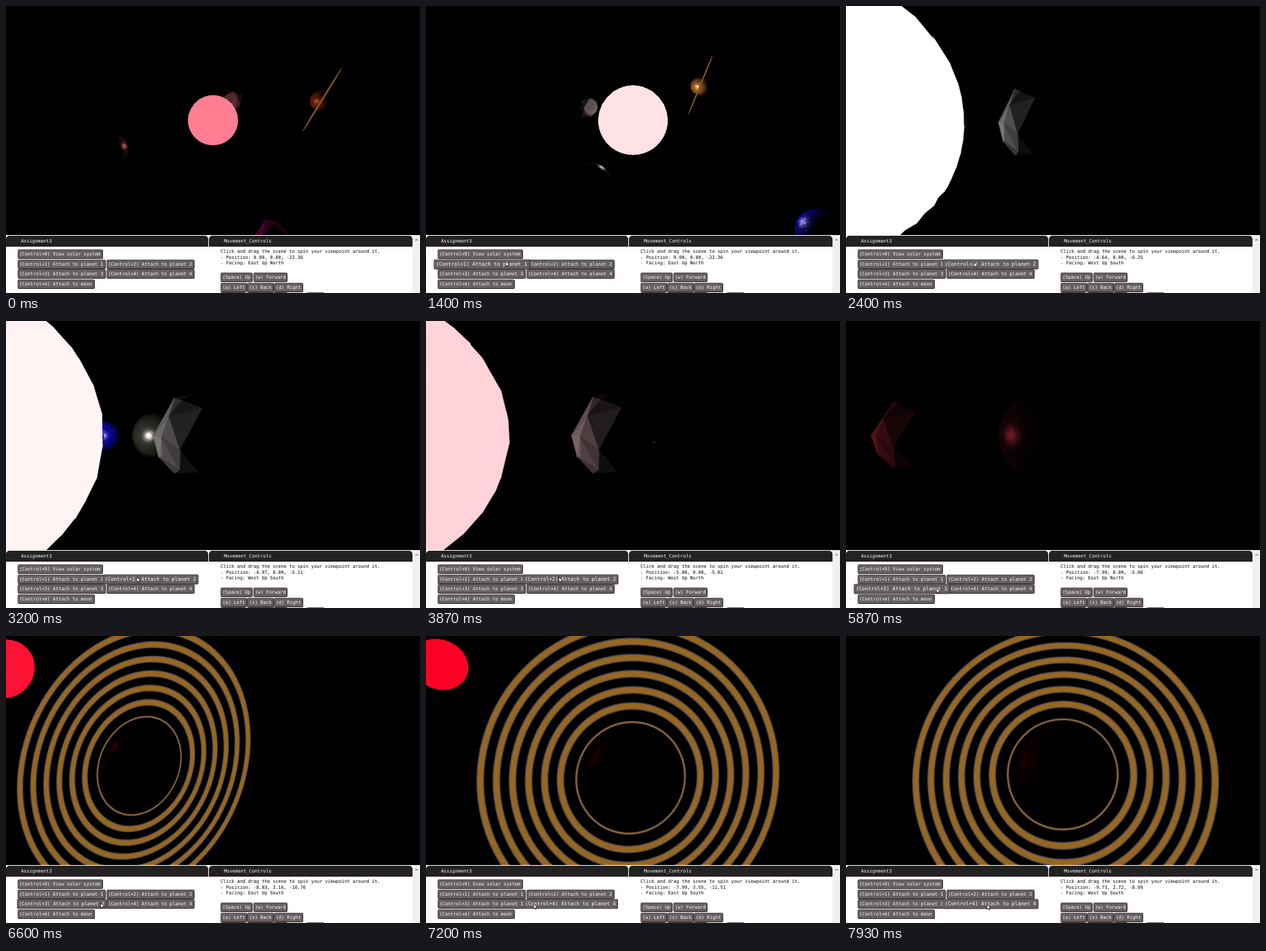
An HTML page with a canvas that plays this animation: 606 px wide and 421 px high, repeating every 8 s.

```html
<!DOCTYPE html>
<html lang="en">
<head>
<meta charset="utf-8">
<title>Solar system</title>
<style>
  html, body { margin: 0; width: 100%; height: 100%; overflow: hidden; background: #fff; }
  #stage { position: relative; width: 606px; height: 421px; overflow: hidden;
           font: 6.7px/8.5px "DejaVu Sans Mono", monospace; color: #000; }
  #stage > * { position: absolute; }
  canvas { left: 0; top: 0; }
  .bar { top: 337px; height: 16px; box-sizing: border-box; padding-left: 22px; color: #fff;
         background: #222; border-bottom: 1px solid #2c1420; border-radius: 5px 5px 0 0;
         font-size: 6.8px; line-height: 17px; }
  .button { height: 14px; box-sizing: border-box; padding-left: 2px; color: #fff;
            background: #666060; border: 1px solid #2c2424; border-left-color: #5a5252;
            border-top-color: #5a5252; border-radius: 2.5px; white-space: pre;
            font-size: 6.8px; line-height: 12px; }
  #info { left: 314px; top: 356px; margin: 0; font: inherit; }
  #scroll { left: 595px; top: 336px; width: 11px; height: 85px; background: #f0f0f0; }
  #scroll::after { content: ""; position: absolute; left: 3px; top: 5px;
                   border: 3px solid transparent; border-top: 0; border-bottom: 3.5px solid #a0a0a0; }
  #cursor { z-index: 3; left: 0; top: 0; }
</style>
</head>
<body>
<div id="stage">
  <canvas id="view" width="606" height="336"></canvas>
  <div class="bar" style="left:0;width:296px">Assignment3</div>
  <div class="bar" style="left:297px;width:298px">Movement_Controls</div>
  <pre id="info"></pre>
  <div id="scroll"></div>
  <svg id="cursor" width="8" height="11" viewBox="0 0 8 11">
    <path d="M.5 .5V8L2.3 6.4 3.5 9 4.6 8.5 3.5 6H6Z" fill="#fff" stroke="#000" stroke-width=".7"/>
  </svg>
</div>
<script>
const LOOP = 8000, RATE = 29, START = 20, FOCAL = 405.6, CX = 303, CY = 167.5;
const stage = document.getElementById("stage");
const info = document.getElementById("info");
const cursor = document.getElementById("cursor");
const ctx = document.getElementById("view").getContext("2d");

// Affine transforms: three rows of four
const mul = (a, b) => a.map(r => [0, 1, 2, 3].map(j =>
  r[0] * b[0][j] + r[1] * b[1][j] + r[2] * b[2][j] + (j === 3 ? r[3] : 0)));
const apply = (m, p) => m.map(r => r[0] * p[0] + r[1] * p[1] + r[2] * p[2] + r[3]);
const turn = (m, p) => m.map(r => r[0] * p[0] + r[1] * p[1] + r[2] * p[2]);
const translate = (x, y, z) => [[1, 0, 0, x], [0, 1, 0, y], [0, 0, 1, z]];
const scale = s => [[s, 0, 0, 0], [0, s, 0, 0], [0, 0, s, 0]];
const invertRigid = m => [0, 1, 2].map(i => [m[0][i], m[1][i], m[2][i],
  -(m[0][i] * m[0][3] + m[1][i] * m[1][3] + m[2][i] * m[2][3])]);
const dot = (a, b) => a[0] * b[0] + a[1] * b[1] + a[2] * b[2];
const unit = v => { const l = Math.hypot(...v) || 1; return v.map(x => x / l); };
function rotate(angle, axis) {
  const [x, y, z] = unit(axis), c = Math.cos(angle), s = Math.sin(angle), k = 1 - c;
  return [[c + x * x * k, x * y * k - z * s, x * z * k + y * s, 0],
          [x * y * k + z * s, c + y * y * k, y * z * k - x * s, 0],
          [x * z * k - y * s, y * z * k + x * s, c + z * z * k, 0]];
}
const Y = [0, 1, 0];

// Sphere made by subdividing a tetrahedron
function sphere(level) {
  const p = [[0, 0, -1], [0, .9428, .3333], [-.8165, -.4714, .3333], [.8165, -.4714, .3333]];
  const mid = (a, b) => unit(a.map((x, i) => x + b[i]));
  const split = (a, b, c, n) => {
    if (!n) return [{ corners: [a, b, c], normal: unit(a.map((x, i) => x + b[i] + c[i])) }];
    const ab = mid(a, b), bc = mid(b, c), ca = mid(c, a);
    return [[a, ab, ca], [ab, b, bc], [ca, bc, c], [ab, bc, ca]].flatMap(f => split(...f, n - 1));
  };
  return [[0, 1, 2], [3, 2, 1], [1, 0, 3], [0, 2, 3]]
    .flatMap(f => split(...f.map(i => p[i]), level));
}
const mesh = [1, 2, 3, 4, 5].reduce((all, n) => (all[n] = sphere(n), all), []);

const orbit = (angle, radius) => mul(rotate(angle, Y), translate(radius, 0, 0));
const planet = {
  1: t => orbit(t, 5),
  2: t => orbit(t / 2, 8),
  3: t => mul(orbit(t / 3, 11), rotate(Math.sin(t), [1, 1, 1])),
  4: t => orbit(t / 4, 14)
};
function moon(t) {
  const m = orbit(2 * t, 2.3), home = planet[4](t);
  return m.map((r, i) => [r[0], r[1], r[2], r[3] + home[i][3]]);
}

// The camera moves a tenth of the way to the attached planet at every step
const attachments = [[46, 1], [119, 2], [172, 3]];
const cameras = [];
{
  const h = Math.sqrt(5);
  let camera = [[1, 0, 0, 0], [0, 2 / h, -1 / h, 0], [0, 1 / h, 2 / h, -10 * h]];
  for (let k = 0; k <= LOOP / 1000 * RATE; k++) {
    const active = attachments.filter(a => k >= a[0]).pop();
    if (active) {
      const goal = invertRigid(mul(planet[active[1]](START + k / RATE), translate(0, 0, 5)));
      camera = camera.map((r, i) => r.map((x, j) => x + .1 * (goal[i][j] - x)));
    }
    cameras.push(camera);
  }
}

function project(v) {
  const k = FOCAL / Math.max(.1, -v[2]);
  return [CX + v[0] * k, CY - v[1] * k];
}
function tracePath(points) {
  points.forEach((p, i) => i ? ctx.lineTo(p[0], p[1]) : ctx.moveTo(p[0], p[1]));
  ctx.closePath();
}
const rgb = c => `rgb(${c.map(x => Math.round(255 * Math.min(1, x)))})`;

function shade(v, n, light, look) {
  const toLight = light.position.map((x, i) => x - v[i]);
  const L = unit(toLight), E = unit(v.map(x => -x));
  const diffuse = dot(n, L);
  if (diffuse <= 0) return [0, 0, 0];
  const power = 1 / (1 + dot(toLight, toLight) / light.size);
  const half = unit(L.map((x, i) => x + E[i]));
  const shine = look.shine * Math.max(0, dot(n, half)) ** 40;
  return look.color.map((c, i) => power * light.color[i] * (c * diffuse + shine));
}

function drawSphere(view, light, look) {
  const paint = color => {
    ctx.fillStyle = ctx.strokeStyle = rgb(color);
    ctx.fill();
    ctx.stroke();
  };
  ctx.lineWidth = look.glow ? .3 : .7;
  ctx.beginPath();
  for (const face of mesh[look.level]) {
    const v = apply(view, face.normal), n = unit(turn(view, face.normal));
    if (dot(n, v) > 0) continue;
    const corners = face.corners.map(p => apply(view, p));
    if (corners.some(p => p[2] > -.1)) continue;
    if (!look.glow) ctx.beginPath();
    tracePath(corners.map(project));
    if (!look.glow) paint(shade(v, n, light, look));
  }
  // A glowing body has one flat colour, so all its faces share a path
  if (look.glow) paint(light.color);
}

function drawBand(view, radius, halfWidth, color) {
  const circle = r => Array.from({ length: 90 }, (_, i) => {
    const a = i * Math.PI / 45;
    return project(apply(view, [r * Math.cos(a), r * Math.sin(a), 0]));
  });
  ctx.fillStyle = ctx.strokeStyle = color;
  ctx.lineWidth = .3;
  ctx.beginPath();
  tracePath(circle(radius + halfWidth));
  tracePath(circle(radius - halfWidth));
  ctx.fill("evenodd");
  ctx.stroke();
}
function drawRings(view) {
  drawBand(view, 1.2, .02, "#80603c");
  for (let i = 1; i <= 6; i++) {
    drawBand(view, 1.2 + .344 * i, .08, "#504a50");
    drawBand(view, 1.2 + .344 * i, .056, "#966722");
  }
}

function drawScene(step) {
  const t = START + step / RATE, camera = cameras[step];
  const swell = Math.sin(t * Math.PI / 5);
  const light = { position: camera.map(r => r[3]), size: 10 ** (2 + swell),
                  color: [1, .5 + .5 * swell, .57 + .43 * swell] };
  const bodies = [
    { model: scale(2 + swell), level: 4, glow: true },
    { model: planet[1](t), level: 2, color: [.5, .5, .5], shine: 0 },
    { model: planet[2](t), level: 5, color: [.22, .24, .21], shine: 1 },
    { model: planet[3](t), level: 4, color: [.75, .48, .18], shine: .9, rings: true },
    { model: planet[4](t), level: 4, color: [.06, .06, .85], shine: .9 },
    { model: moon(t), level: 1, color: [1.2, .15, 1.2], shine: 0 }
  ];
  ctx.fillStyle = "#000";
  ctx.fillRect(0, 0, 606, 336);
  bodies.map(look => ({ look, view: mul(camera, look.model) }))
    .sort((a, b) => a.view[2][3] - b.view[2][3])
    .forEach(({ look, view }) => {
      if (view[2][3] > -.5) return;
      drawSphere(view, light, look);
      if (look.rings) drawRings(view);
    });

  const position = light.position.map(x => x.toFixed(2).replace(/^-0\.00$/, "0.00")).join(", ");
  const [x, y, z] = camera.map(r => r[2]);
  const facing = [x > 0 ? "West" : "East", y > 1e-6 ? "Down" : "Up", z > 0 ? "North" : "South"].join(" ");
  info.textContent = "Click and drag the scene to spin your viewpoint around it.\n" +
    `- Position: ${position}\n- Facing: ${facing}`;
}

function addButton(x, y, w, label) {
  const el = document.createElement("div");
  el.className = "button";
  el.textContent = label;
  el.style.cssText = `left:${x}px;top:${y}px;width:${w}px`;
  stage.append(el);
  return { el, x, y, w };
}
const buttons = [
  addButton(16.5, 357, 125.5, "(Control+0) View solar system"),
  addButton(16.5, 371.7, 129.5, "(Control+1) Attach to planet 1"),
  addButton(146.5, 371.7, 129, "(Control+2) Attach to planet 2"),
  addButton(16.5, 386.3, 129.5, "(Control+3) Attach to planet 3"),
  addButton(146.5, 386.3, 129, "(Control+4) Attach to planet 4"),
  addButton(16.5, 401, 113.5, "(Control+m) Attach to moon")
];
addButton(314, 391.3, 47, "(Space) Up");
addButton(361.5, 391.3, 50.5, "(w) Forward");
addButton(314, 406, 38.5, "(a) Left");
addButton(353, 406, 38.5, "(s) Back");
addButton(392, 406, 42.5, "(d) Right");
addButton(314, 420, 37, "");
addButton(352, 420, 60, "");
addButton(440, 420, 26, "");

// Pointer path: time, x, y
const pointerPath = [
  [0, 130, 430], [300, 130, 430], [800, 117, 374], [1600, 116, 374], [1850, 130, 377],
  [2400, 187, 375], [3870, 194, 375], [4650, 194, 375], [4930, 147, 393], [5250, 130, 391],
  [6000, 132, 391], [6250, 136, 404], [6560, 138, 404], [6600, 138, 391], [6900, 144, 392],
  [7930, 206, 393], [8000, 206, 393]
];
function pointerAt(ms) {
  ms = Math.max(0, ms);
  const i = Math.max(1, pointerPath.findIndex(p => p[0] >= ms));
  const [t0, x0, y0] = pointerPath[i - 1], [t1, x1, y1] = pointerPath[i];
  const u = (ms - t0) / (t1 - t0), e = u * u * (3 - 2 * u);
  return [x0 + (x1 - x0) * e, y0 + (y1 - y0) * e];
}
function drawPointer(ms) {
  const trail = Array.from({ length: 10 }, (_, i) => pointerAt(ms - i * 20));
  for (const b of buttons) {
    const over = trail.filter(([x, y]) => x >= b.x && x < b.x + b.w && y >= b.y && y < b.y + 14.6).length / 10;
    b.el.style.transform = over ? `scale(${1 + .09 * over})` : "";
    b.el.style.zIndex = over ? 1 : 0;
  }
  const [x, y] = trail[0];
  cursor.style.transform = `translate(${x}px, ${y}px)`;
}

function frame() {
  const ms = performance.now() % LOOP;
  drawScene(Math.round(ms / 1000 * RATE));
  drawPointer(ms);
  requestAnimationFrame(frame);
}
frame();
</script>
</body>
</html>
```
